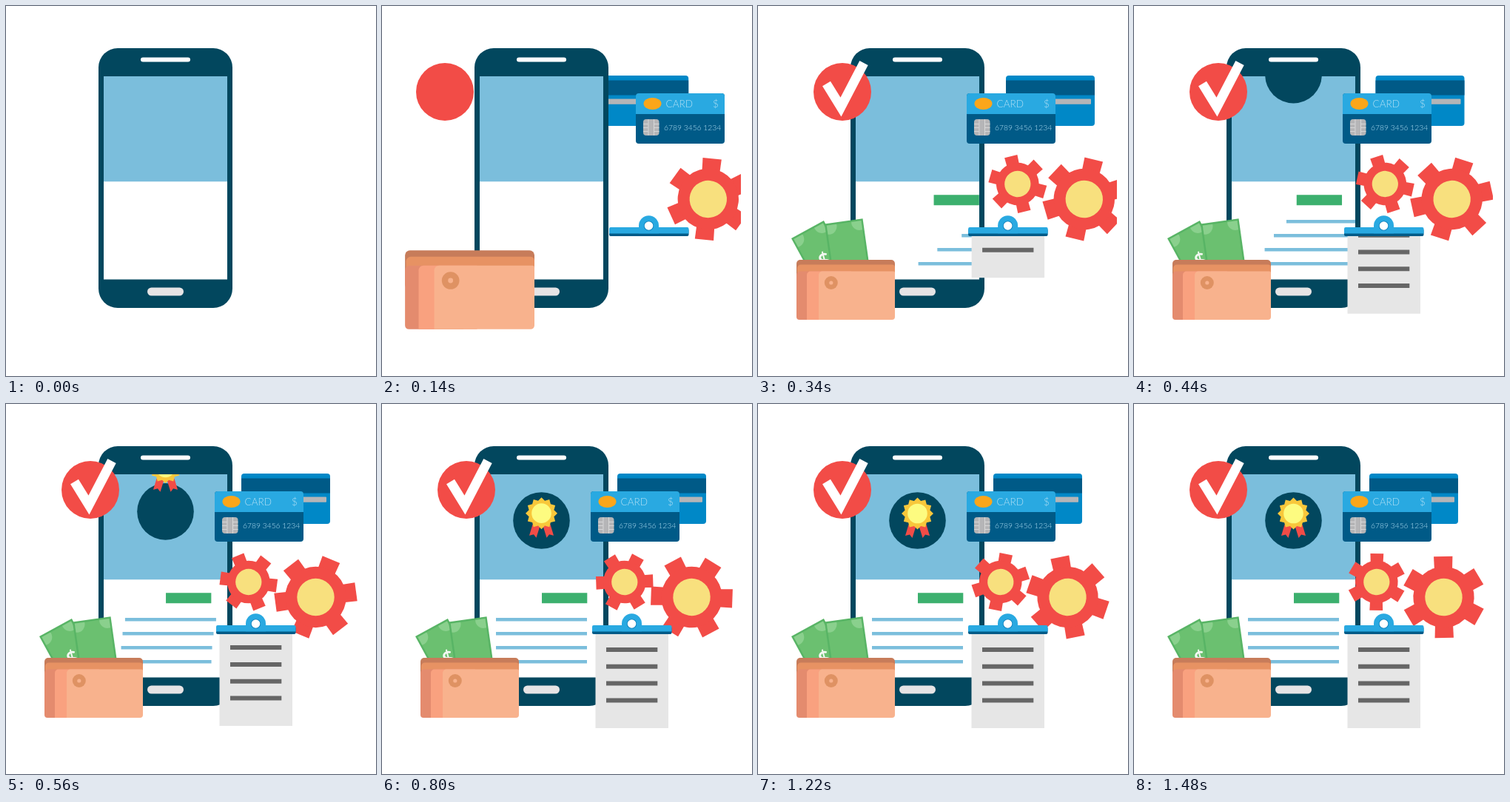
Write an HTML page with a canvas that moves like this. It is 500 px wide and 500 px high and loops after 1.5 s.

```html
<!DOCTYPE html>
<html lang="en">
<head>
<meta charset="utf-8">
<title>Mobile payment</title>
<style>
  html, body { margin: 0; width: 100%; height: 100%; overflow: hidden; background: #fff; }
  canvas { display: block; width: 500px; height: 500px; }
</style>
</head>
<body>
<canvas id="stage"></canvas>
<script>
const LOOP = 1500, STEP = 20, TAU = 2 * Math.PI;
const NAVY = '#02475e', SKY = '#7bbedc', RED = '#f24c47', YELLOW = '#f8e07e',
      BLUE = '#29a9e1', DEEP = '#005a87', GREY = '#b5b5b7';

const canvas = document.getElementById('stage');
const ctx = canvas.getContext('2d');
const dpr = window.devicePixelRatio || 1;
canvas.width = canvas.height = 500 * dpr;

// Timing
const progress = (t, start, end) => Math.min(1, Math.max(0, (t - start) / (end - start)));
const mix = (a, b, p) => a + (b - a) * p;
const easeOut = p => 1 - (1 - p) ** 3;
const easeInOut = p => (1 - Math.cos(Math.PI * p)) / 2;

// Shoots from one value to a peak, may hold there, then settles on rest.
function overshoot(t, from, peak, rest, { start = 0, out = 140, hold = out, end = 320 }) {
  return t < out
    ? mix(from, peak, easeOut(progress(t, start, out)))
    : mix(peak, rest, easeInOut(progress(t, hold, end)));
}

// Remaining distance of a long slide towards rest.
const slide = (t, start, dur, dist) => dist * (1 - progress(t, start, start + dur)) ** 4;

const reveal = t => easeOut(progress(t, 180, 320));

// Drawing
function rect(color, x, y, w, h, r = 0) {
  ctx.fillStyle = color;
  ctx.beginPath();
  ctx.roundRect(x, y, w, h, r);
  ctx.fill();
}

function disc(color, x, y, rx, ry = rx) {
  ctx.fillStyle = color;
  ctx.beginPath();
  ctx.ellipse(x, y, rx, ry, 0, 0, TAU);
  ctx.fill();
}

function trace(...pts) {
  ctx.beginPath();
  for (let i = 0; i < pts.length; i += 2) ctx.lineTo(pts[i], pts[i + 1]);
}

function poly(color, ...pts) {
  trace(...pts);
  ctx.closePath();
  ctx.fillStyle = color;
  ctx.fill();
}

function group(draw) {
  ctx.save();
  draw();
  ctx.restore();
}

function shifted(x, y, draw) {
  group(() => { ctx.translate(x, y); draw(); });
}

function scaled(x, y, s, draw) {
  if (s > 0) shifted(x, y, () => {
    ctx.scale(s, s);
    ctx.translate(-x, -y);
    draw();
  });
}

function clipped(x, y, w, h, draw) {
  group(() => {
    ctx.beginPath();
    ctx.rect(x, y, w, h);
    ctx.clip();
    draw();
  });
}

function repeat(n, draw) {
  for (let i = 0; i < n; i++) draw(i);
}

// Parts
function phone(t) {
  rect(NAVY, 125, 57, 181, 351, 26);
  rect('#fff', 182, 69.5, 67, 6, 3);
  rect('#e6e4e5', 191, 380.5, 49, 11, 5.5);
  clipped(132, 95, 167, 274.5, () => {
    rect('#fff', 132, 95, 167, 275);
    rect(SKY, 132, 95, 167, 142.3);
    rect('#3cb06e', 216 + slide(t, 227, 395, 83), 255.3, 61.3, 14);
    repeat(4, i =>
      rect(SKY, 154 + slide(t, 348 - i * 28.5, 395, 150), 289 + i * 19, 123, 4.4));
    disc(NAVY, 215.5, 157.5 - slide(t, 397, 395, 102), 38.3);
    shifted(215.5, 148 - slide(t, 530, 360, 88), medal);
  });
}

function medal() {
  for (const s of [-1, 1])
    poly(RED, s * 2, 17, s * 12, 15, s * 16.5, 30, s * 10.5, 28.5, s * 7, 33);
  ctx.beginPath();
  repeat(24, i => {
    const a = i * TAU / 24, r = i % 2 ? 17.5 : 21.5;
    ctx.lineTo(r * Math.sin(a), -r * Math.cos(a));
  });
  ctx.fillStyle = '#f8c73b';
  ctx.fill();
  disc('#fdfb80', 0, 0, 13.3);
}

function badge(t) {
  shifted(overshoot(t, 55, -29, 0, {}), 0, () => {
    disc(RED, 114, 116, 39);
    const len = 105 * reveal(t);
    if (!len) return;
    ctx.strokeStyle = '#fff';
    ctx.lineWidth = 12.8;
    ctx.setLineDash([len, 200]);
    trace(92.5, 105, 112, 136.5, 143, 77);
    ctx.stroke();
  });
}

function backCard(t) {
  shifted(overshoot(t, -135, 17, 0, { start: 30, out: 340, end: 540 }), 0, () => {
    rect('#0088c7', 318, 94, 120, 68, 4);
    rect(DEEP, 318, 100.5, 120, 20);
    rect(GREY, 326, 125.5, 107, 7.2, 1);
  });
}

function frontCard(t) {
  shifted(overshoot(t, -100, 61, 0, {}), 0, () => {
    rect(DEEP, 282, 118, 120, 68, 4);
    rect(BLUE, 282, 118, 120, 28, [4, 4, 0, 0]);
    disc('#fba61a', 304.5, 132, 12, 8);
    ctx.fillStyle = '#b4e1f5';
    ctx.font = '300 13.5px Lato, sans-serif';
    ctx.fillText('CARD', 322.5, 137);
    ctx.fillText('$', 386, 137);
    ctx.font = '300 10.3px Lato, sans-serif';
    ctx.fillText('6789 3456 1234', 320, 168.3);
    chip(292, 153);
  });
}

function chip(x, y) {
  const line = '#dcdcdc';
  rect(GREY, x, y, 21.5, 22, 4);
  repeat(2, i => rect(line, x + 6.5 + i * 7.5, y, 0.9, 22));
  repeat(3, i => {
    rect(line, x, y + 6 + i * 5, 6.5, 0.9);
    rect(line, x + 14.5, y + 6 + i * 5, 7, 0.9);
  });
}

function gear(x, y, size, angle) {
  shifted(x, y, () => {
    ctx.scale(size, size);
    ctx.rotate(angle);
    repeat(6, () => {
      poly(RED, -12.7, -55, 12.7, -55, 12, -36, -12, -36);
      ctx.rotate(TAU / 6);
    });
    disc(RED, 0, 0, 41.2);
    disc(YELLOW, 0, 0, 25.2);
  });
}

// Both gears turn by one tooth per loop, in opposite directions.
const turn = t => TAU / 6 * t / LOOP;

function bigGear(t) {
  const dx = overshoot(t, -175, 22.3, 0, { hold: 340, end: 540 });
  gear(418.5 + dx, 261, 1, turn(t));
}

function smallGear(t) {
  const dx = overshoot(t, -80, 23, 0, { start: 140, out: 340, end: 540 });
  gear(327.8 + dx, 240.5, 0.7, -turn(t));
}

function clipboard(t) {
  shifted(overshoot(t, -90, 23, 0, { end: 350 }), 0, () => {
    clipped(280, 309, 115, 135, () => shifted(0, -slide(t, 275, 465, 129), () => {
      rect('#e6e6e6', 288.5, 309, 98.5, 129);
      repeat(4, i => rect('#666', 303, 329 + i * 22.8, 69.3, 6));
    }));
    rect(DEEP, 284, 301, 107.5, 10, 2);
    rect(BLUE, 284, 299, 107.5, 8.5, [2, 2, 0, 0]);
    rect(BLUE, 324, 283.3, 27, 24, [13.5, 13.5, 0, 0]);
    disc('#0f7fba', 337.5, 297, 6.6);
    disc('#fff', 337.5, 297, 5.8);
  });
}

// A banknote by its top left corner, tilted by an angle.
function bill(x, y, w, angle) {
  shifted(x, y, () => {
    ctx.rotate(angle);
    rect('#58b465', 0, 0, w, 70);
    clipped(2.5, 2.5, w - 5, 68, () => {
      rect('#6bc070', 0, 0, w, 70);
      for (const cx of [5, w - 5]) disc('#8ad08d', cx, 4, 11);
    });
  });
}

function wallet(t) {
  scaled(118, 383.5, reveal(t), () => {
    bill(45, 314, 50, -0.5);
    bill(90, 294.5, 52, -0.14);
    ctx.translate(93, 353);
    ctx.rotate(-0.35);
    ctx.fillStyle = '#f4f8f2';
    ctx.font = 'bold 27px Lato, sans-serif';
    ctx.textAlign = 'center';
    ctx.fillText('$', 0, 0);
  });
  scaled(118.3, 383.5, overshoot(t, 0, 1.315, 1, {}), () => {
    rect('#c77c5a', 52, 343, 133, 40, 5);
    rect('#e79263', 53, 349.5, 132, 40, [5, 4, 0, 0]);
    rect('#e48b6e', 52, 358.5, 60, 65.5, [5, 0, 0, 4]);
    rect('#f9a17f', 66, 358.5, 60, 65.5, [5, 0, 0, 0]);
    rect('#f8b28d', 82, 358.5, 103, 65.5, [5, 2, 4, 0]);
    disc('#df9263', 98.8, 374, 9);
    disc('#f8b28d', 98.8, 374, 2.6);
  });
}

function render(t) {
  ctx.setTransform(dpr, 0, 0, dpr, 0, 0);
  rect('#fff', 0, 0, 500, 500);
  // These slip out from behind the phone, then settle over it.
  const gearOut = t >= 340, restOut = t >= 140;
  const rest = () => [badge, frontCard, clipboard].forEach(draw => draw(t));
  clipped(15, 15, 470, 470, () => {
    backCard(t);
    bigGear(t);
    if (!gearOut) smallGear(t);
    if (!restOut) rest();
    phone(t);
    if (gearOut) smallGear(t);
    if (restOut) rest();
    wallet(t);
  });
}

const begin = performance.now();
function tick() {
  const t = (performance.now() - begin) % LOOP;
  render(Math.floor(t / STEP) * STEP);
  requestAnimationFrame(tick);
}
tick();
</script>
</body>
</html>
```
